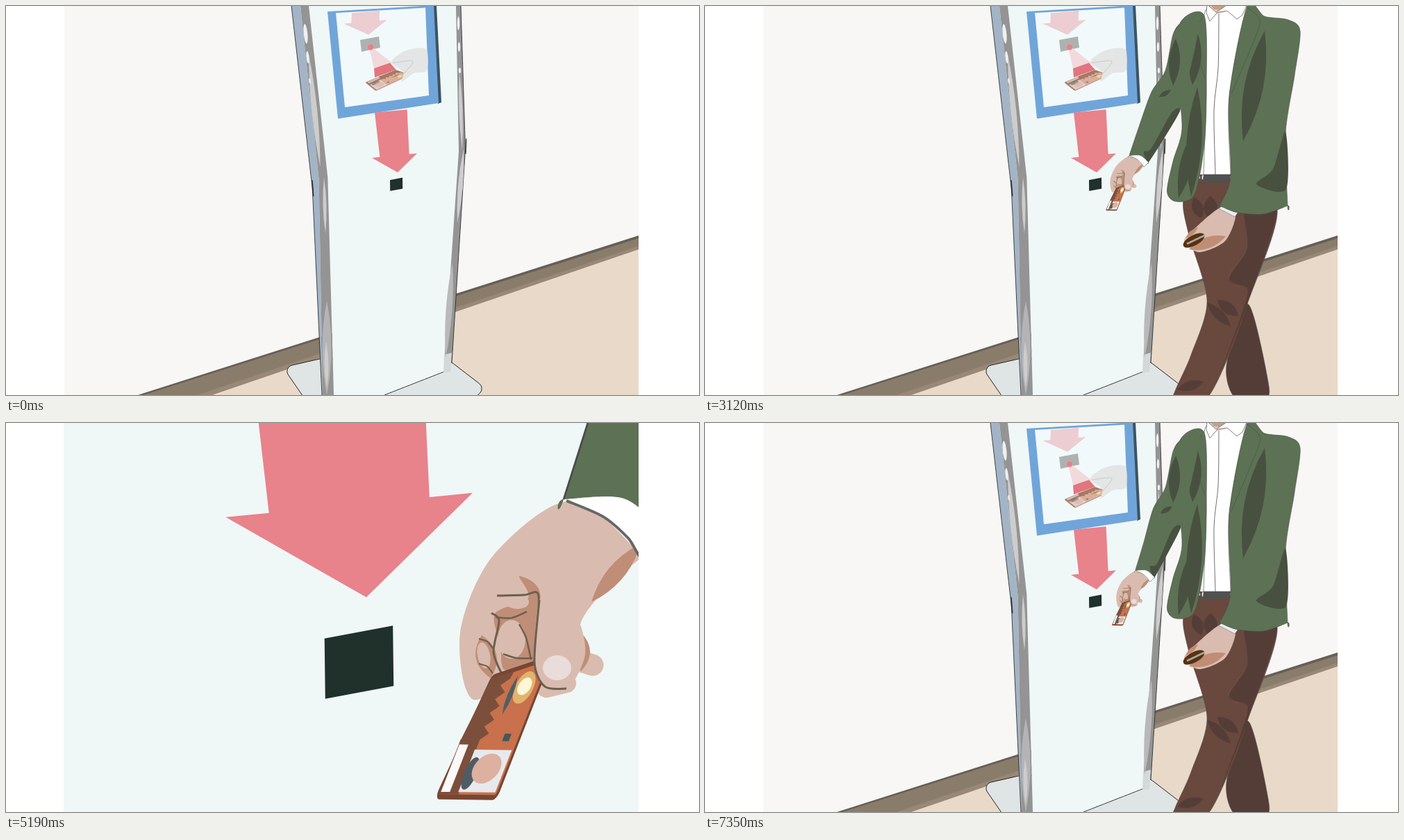
An HTML page with a canvas for the animation above (8 s loop, 998 by 561 pixels).

```html
<!DOCTYPE html>
<html lang="en">
<head>
<meta charset="utf-8">
<title>Card reader kiosk</title>
<style>
html, body { margin: 0; width: 100%; height: 100%; overflow: hidden; background: #fff; }
canvas { display: block; width: 100vw; height: 100vh; }
</style>
</head>
<body>
<canvas id="stage" width="998" height="561"></canvas>
<script>
const ctx = document.getElementById('stage').getContext('2d');
const LOOP = 8000, TICK = 76.9, CLOSE = 5.47;
const FOCUS = [574.1, 237.5];
const WRIST = [835, 160];   // in close-up coordinates
const SKIN = '#d9bcaf', SHADE = '#c08d76', CREASE = '#6c6050';
const GREEN = '#5d7155', MOSS = '#485140', BROWN = '#69483d', DARK = '#553d37';
const INK = '#4b4b4b', GREY = '#949494', SHINE = '#cdcdcd';

const clamp = (v, a, b) => Math.max(a, Math.min(b, v));
const mix = (a, b, p) => a + (b - a) * p;
const ease = p => p < .5 ? (2 * p) ** 2.1 / 2 : 1 - (2 - 2 * p) ** 2.1 / 2;
const steps = (t, start, n) => clamp(Math.floor((t - start) / TICK + .15) + 1, 0, n) / n;
const parse = src => typeof src === 'string' ? src.split(' ').map(p => p.split(',').map(Number)) : src;

function paint(fill, edge, width = .7) {
  if (fill) { ctx.fillStyle = fill; ctx.fill(); }
  if (edge) { ctx.strokeStyle = edge; ctx.lineWidth = width; ctx.stroke(); }
}

function poly(src, fill, edge, width) {
  ctx.beginPath();
  parse(src).forEach(p => ctx.lineTo(...p));
  ctx.closePath();
  paint(fill, edge, width);
}

function rounded(src, r, fill, edge, width) {
  const p = parse(src), n = p.length;
  ctx.beginPath();
  ctx.moveTo((p[0][0] + p[n - 1][0]) / 2, (p[0][1] + p[n - 1][1]) / 2);
  p.forEach((q, i) => ctx.arcTo(...q, ...p[(i + 1) % n], r));
  ctx.closePath();
  paint(fill, edge, width);
}

// Smooth curve through the points; a repeated point makes a corner
function curve(p, at) {
  ctx.beginPath();
  ctx.moveTo(...at(0));
  const n = at(p.length) === p[0] ? p.length : p.length - 1;
  for (let i = 0; i < n; i++) {
    const [a, b, c, d] = [-1, 0, 1, 2].map(k => at(i + k));
    ctx.bezierCurveTo(b[0] + (c[0] - a[0]) / 7, b[1] + (c[1] - a[1]) / 7,
      c[0] - (d[0] - b[0]) / 7, c[1] - (d[1] - b[1]) / 7, ...c);
  }
}

function blob(src, fill, edge, width) {
  const p = parse(src), n = p.length;
  curve(p, i => p[(i + n) % n]);
  paint(fill, edge, width);
}

function line(src, color, width) {
  const p = parse(src);
  curve(p, i => p[clamp(i, 0, p.length - 1)]);
  paint(null, color, width);
}

// Leaf shape between two points, used for folds, shadows and reflections
function leaf(x0, y0, x1, y1, w, fill) {
  const len = Math.hypot(x1 - x0, y1 - y0);
  const mx = (x0 + x1) / 2, my = (y0 + y1) / 2;
  const nx = (y0 - y1) / len * w, ny = (x1 - x0) / len * w;
  ctx.beginPath();
  ctx.moveTo(x0, y0);
  ctx.quadraticCurveTo(mx + nx, my + ny, x1, y1);
  ctx.quadraticCurveTo(mx - nx, my - ny, x0, y0);
  paint(fill);
}

function oval(x, y, rx, ry, fill, turn = 0) {
  ctx.beginPath();
  ctx.ellipse(x, y, rx, ry, turn, 0, 7);
  paint(fill);
}

function finger(x0, y0, x1, y1, width, color) {
  ctx.lineCap = 'round';
  line([[x0, y0], [x1, y1]], color, width);
  ctx.lineCap = 'butt';
}

function magnify(scale) {
  ctx.translate(...FOCUS);
  ctx.scale(scale, scale);
  ctx.translate(-FOCUS[0], -FOCUS[1]);
}

function drawRoom() {
  poly('0,0 998,0 998,561 0,561', '#f8f7f5');
  const strip = (x, y, fill) => poly([[x, 561], [911, y], [911, 561]], fill);
  strip(190, 331, '#655f57');
  strip(198, 335, '#8a7c6b');
  strip(276, 346, '#998877');
  strip(297, 351, '#e9d9c9');
}

// Head centre, half width and rise, then tip and stem top
function arrow([x, y], w, rise, tip, [tx, ty], flare, fill) {
  const side = k => [x + k * w, y - k * rise];
  const top = k => [tx + k * w, ty - k * rise];
  poly([top(-flare), top(flare), side(.65), side(1), tip, side(-1), side(-.65)], fill);
}

// Card on a 100 by 100 grid, spanned by its bottom edge u and its long edge v
function drawCard(origin, u, v) {
  const box = (x, y, w, h, fill) => { ctx.fillStyle = fill; ctx.fillRect(x, y, w, h); };
  ctx.save();
  ctx.transform(u[0] / 100, u[1] / 100, v[0] / 100, v[1] / 100, ...origin);
  rounded('0,0 100,0 100,100 78,108 15,96', 5, '#c8714c', '#774733', 4);
  box(3, 2, 32, 44, '#7c4f3c');
  const teeth = [[3, 44], [15, 95], [48, 101]];
  for (let i = 0; i < 10; i++) teeth.push([i % 2 ? 34 : 46, 95 - i * 5.5]);
  poly(teeth, '#7c4f3c');
  box(4, 4, 15, 38, '#fbf9f8');
  box(33, 4, 62, 34, '#e7e9ec');
  oval(41, 19, 11, 13, '#4e5d63');
  oval(65, 23, 23, 12, '#ddb0a0');
  oval(75, 88, 16, 13, '#e3b46b');
  oval(75, 89, 11, 7, '#fff6d8');
  leaf(56, 66, 57, 97, 9, '#505f63');
  box(73, 45, 11, 6, '#46565c');
  ctx.restore();
}

function drawScreen() {
  poly('615,-1 620,-1 627,139 622,141', '#3d5363');
  poly('463,8 616,-1 623,140 478,162.5', '#70a5da');
  poly('475,10 604,2.5 609,129 488,146', '#f2f9fa');
  arrow([517.5, 22.7], 31, 2.7, [522, 41.5], [518, 8.5], .65, '#eccdd2');
  poly('510,49 537,44 539,60 512,66', '#adb2b1');
  poly('523,60 528,60 557,83 530,90', '#f2d9dc');
  ctx.globalAlpha = .55;
  drawCard([518, 110], [15, 12], [43, -20]);
  ctx.globalAlpha = 1;
  poly('530,90 553,82 562,92 531,103', '#e2757d');
  oval(525, 59.5, 4, 4, '#ee7e84');
  blob('555,81 570,67 590,61 606,64 606,93 587,97 570,109 572,95', '#e4e5e5');
  line('557,82 586,80 567,104', '#c9c8c7', 1);
}

function drawKiosk() {
  // Each edge runs from the top over the bend to the foot
  const outer = parse('411,0 441.3,264 455,561'), seam = parse('424,0 450.6,250 456,561');
  const inner = parse('436,0 463.3,247 472,561');
  const rightIn = parse('648,0 652,210 631,515'), rightOut = parse('655,0 661.5,206 642,515');
  const between = (a, b, fill) => poly([...a, ...[...b].reverse()], fill);

  rounded('456,508 399,521 434,572 668,572 690,551 642,514', 9, '#dfe4e5', '#222', 1);
  between(inner, [...rightIn, [632, 528], [545, 561]], '#f0f7f7');
  line('545,561 632,527', '#333', 1);
  between(outer, seam, '#a3b4c6');
  between(seam, inner, GREY);
  between(rightIn, rightOut, GREY);
  poly('631,503 642,500 640,528 630,529', '#d3d8d8');
  for (const [a, b, c] of [outer, rightOut]) {
    line([a, b, b, c], '#1c1c1c', .8);
  }

  leaf(436, 70, 452.5, 232, 8, SHINE);
  leaf(458, 247, 460, 328, 5, SHINE);
  leaf(462, 425, 462, 561, 13, '#b4b4b4');
  leaf(461, 484, 462, 550, 6, SHINE);
  leaf(653, 95, 657, 208, 5, SHINE);
  leaf(659, 206, 650, 313, 7, SHINE);
  leaf(643, 370, 633, 508, 9, '#b9b9b9');
  for (let i = 0; i < 3; i++) {
    oval(431.5 + i * 3, 40 + i * 34, 2.8 - i * .8, 14 - i * 5, '#f0f0f0', -.1);
    oval(651.5 + i, 25 + i * 34, 1.7, 10 - i * 3, '#f0f0f0');
  }

  drawScreen();
  arrow([559.5, 215.7], 32.5, 3.2, [564, 240], [554.3, 151.5], .717, '#e8828b');
  poly('553,250.9 571,247.5 571.2,263.4 553.2,266.8', '#20302b');
}

// Close-up coordinates, resting on the reading pose
function drawHand() {
  finger(795, 352, 817, 359, 31, SKIN);
  leaf(800, 312, 800, 368, 26, SHADE);
  finger(750, 392, 779, 385, 28, SKIN);
  blob('780,123 672,203 626,312 645,409 735,355 785,380 800,297 845,238 893,185', SKIN);
  leaf(886, 184, 815, 268, 24, SHADE);

  blob('711,231 741,255 734,357 690,366 684,330 676,285 724,262', SHADE);
  leaf(657, 316, 670, 378, 30, SHADE);
  oval(660, 345, 9, 19, SKIN, -.2);
  oval(700, 322, 20, 28, SKIN);
  oval(707, 267, 18, 11, SKIN, .1);
  line('679,259 718,258 738,256 738,300 733,355', CREASE, 3);
  line('671,284 682,295 674,340 686,372', CREASE, 3);
  line('677,290 700,291 722,282', CREASE, 2.5);
  line('711,300 721,320 728,351', CREASE, 2.5);
  line('688,343 707,349 730,349', CREASE, 2.5);
  for (const y of [321, 357]) line([[653, y], [665, y + 4], [673, y + 14]], CREASE, 2.2);

  drawCard([592, 549], [86, 1], [70, -180]);

  blob('741,263 733,355 749,390 786,386 806,343 798,298 775,268', SKIN);
  line('740,265 733,355 748,390 779,393', CREASE, 3);
  oval(765.5, 363, 20.5, 18, '#eadcda');
  blob('777,122 777,122 862,118 927,171 927,171 892,207 892,207 832,146', '#fff');
  line('779,122 832,145 868,176 891,206 927,171', '#676767', 4);
}

// Hand offset from the reading pose; back = 1 is the held-off pose
function armPose(t) {
  const reach = steps(t, 1960, 16) ** 1.5, rest = 1 - reach;
  const back = t < 3420 ? 0 : t < 6890 ? 1 - steps(t, 4890, 12) : 1;
  return { dx: 24.5 * rest + 8.8 * back, dy: 8 * rest - 3.1 * back, turn: -.227 * rest, reach, back };
}

function drawReachingArm({ dx, dy, turn, reach, back }) {
  const ox = FOCUS[0] + (WRIST[0] - FOCUS[0]) / CLOSE + dx;
  const oy = FOCUS[1] + (WRIST[1] - FOCUS[1]) / CLOSE + dy;
  const cos = Math.cos(turn) / CLOSE, sin = Math.sin(turn) / CLOSE;
  const cuff = (x, y) => [ox + (x - WRIST[0]) * cos - (y - WRIST[1]) * sin,
    oy + (x - WRIST[0]) * sin + (y - WRIST[1]) * cos];
  const joint = (x0, y0, x1, y1, pull) => [mix(x0, x1, reach) + 8.8 * pull * back,
    mix(y0, y1, reach) - 3.1 * pull * back];

  ctx.save();
  ctx.transform(cos, sin, -sin, cos, ox, oy);
  ctx.translate(-WRIST[0], -WRIST[1]);
  drawHand();
  ctx.restore();

  const shoulder = [686, 24], upper = joint(660, 53, 674, 41, 0), elbow = joint(650, 140, 643, 124, .3);
  const fore = joint(642, 198, 625, 174, .8), left = cuff(775, 120), right = cuff(927, 171);
  const low = joint(678, 195, 657, 197, .6), high = joint(688, 150, 684, 151, .1);
  const outside = [shoulder, upper, joint(656, 100, 663, 93, 0), elbow, fore, left];
  blob([[712, 19], ...outside, left, cuff(862, 119), right, right, low, high, [697, 100]], GREEN);
  line(outside, INK, .5);
  blob([high, low, right, right, cuff(905, 145), cuff(892, 84), cuff(950, 60), [high[0] - 12, high[1] + 3]], MOSS);
  line([right, low, high], INK, .5);
  leaf(678, 47, ...joint(668, 130, 674, 115, 0), 16, MOSS);
  leaf(...joint(653, 157, 654, 131, .2), ...joint(672, 138, 671, 121, .2), 7, MOSS);
}

function drawWalletHand(shift) {
  ctx.save();
  ctx.translate(-14 * shift, -15 * shift);
  blob('742,291 703,323 690,340 712,355 749,339 764,301', SKIN);
  leaf(697, 351, 750, 332, 16, SHADE);
  leaf(692, 335, 710, 319, 6, SHADE);
  oval(704, 338, 17, 7.5, '#58320f', -.5);
  line('694,343 719,331', '#a5a9a6', 2.5);
  poly('740,292 745,288 768,297 763,304', '#e9edf1', '#777', .6);
  ctx.restore();
}

function drawLegs() {
  blob('751,518 782,430 811,542 806,566 764,566', DARK, INK, .5);
  blob('689,280 697,331 723,425 700,503 677,555 677,566 722,566 757,498 781,430 824,293 757,248 714,248', BROWN, INK, .5);
  blob('778,295 824,293 781,430 742,529 771,450 781,408 754,395 780,350', DARK);
  leaf(738, 424, 768, 447, 16, DARK);
  leaf(723, 428, 757, 462, 14, DARK);
  leaf(704, 276, 715, 306, 16, DARK);
  leaf(728, 274, 728, 308, 20, DARK);
  leaf(680, 553, 718, 542, 14, DARK);
  line('776,305 780,350 754,390 770,406', '#7c5f54', .5);
}

function drawShirt() {
  poly('712,243 758,243 752,255 715,255', '#51514f');
  blob('721,6 722,120 718,243 718,243 757,243 757,243 755,130 781,4', '#fff', INK, .6);
  line('740,10 739,90 733,150 735,243', INK, .8);
  poly('726,0 753,0 749,9 735,12', '#ecd1c0');
  poly('729,0 749,0 741,6 733,5', '#c99f88');
  poly('723,-3 722,10 727,22 738,9 752,7 766,19 774,13 781,-3 754,-3 736,9 728,2', '#fff', INK, .7);
}

function drawJacket(shift, bulge) {
  blob('719,14 684,25 681,100 687,177 674,224 665.5,268 678.5,282 705,272 719,200 722,120', GREEN, INK, .6);
  leaf(709, 117, 700, 275, 22, MOSS);
  leaf(704, 180, 682, 277, 18, MOSS);
  leaf(709, 38, 702, 114, 18, MOSS);
  line('716,17 704,45 720,105', '#47563f', .6);

  drawWalletHand(shift);
  const out = 9 * bulge, hand = (x, y) => [x - 12 * shift, y - 13 * shift];
  const hem = hand(741, 288), end = hand(767, 298);
  blob([[781, 0], [806, 15], [840 + out, 20], [857 + out, 36], [849 + out, 100], [836, 184],
    [839, 288], [839, 288], [805, 300], end, hem, hem, [757, 245], [755, 130]], GREEN, INK, .6);
  leaf(806, 36, 775, 195, 27, MOSS);
  blob('836,181 837,264 794,257 818,235', MOSS);
  line('781,2 798,18 795,39 758,127', '#435139', .6);
  line('836,184 838,240', '#414b3a', .6);
  if (bulge) leaf(835, 42, 851, 23, 7, '#f8f7f5');
}

function drawMan(t) {
  const left = 1 - steps(t, 580, 16);
  ctx.save();
  ctx.translate(256 * left, 0);
  drawLegs();
  drawShirt();
  drawJacket(1 - steps(t, 1960, 11), clamp(left * 8, 0, 1));
  drawReachingArm(armPose(t));
  ctx.restore();
}

function drawBeam() {
  const glow = ctx.createLinearGradient(508, 350, 640, 510);
  glow.addColorStop(0, 'rgba(236,90,100,.3)');
  glow.addColorStop(1, 'rgba(224,50,64,.6)');
  ctx.save();
  magnify(1 / CLOSE);
  poly('496,365 522,345 686,462 652,537 600,537', glow);
  oval(508, 355, 18, 18, '#e9565f');
  ctx.restore();
}

function draw(t) {
  const zoom = mix(1, CLOSE, ease(steps(t, 3420, 16)) - ease(steps(t, 6890, 7)));
  const left = zoom > 1 ? 83 : 84;
  ctx.clearRect(0, 0, 998, 561);
  ctx.save();
  ctx.beginPath();
  ctx.rect(left, 0, 911 - left, 561);
  ctx.clip();
  magnify(zoom);
  drawRoom();
  drawKiosk();
  if (t >= 580) drawMan(t);
  if (t >= 5880 && t < 6820) drawBeam();
  ctx.restore();
}

const begin = performance.now();
function tick() {
  draw((performance.now() - begin) % LOOP);
  requestAnimationFrame(tick);
}
tick();
</script>
</body>
</html>
```
